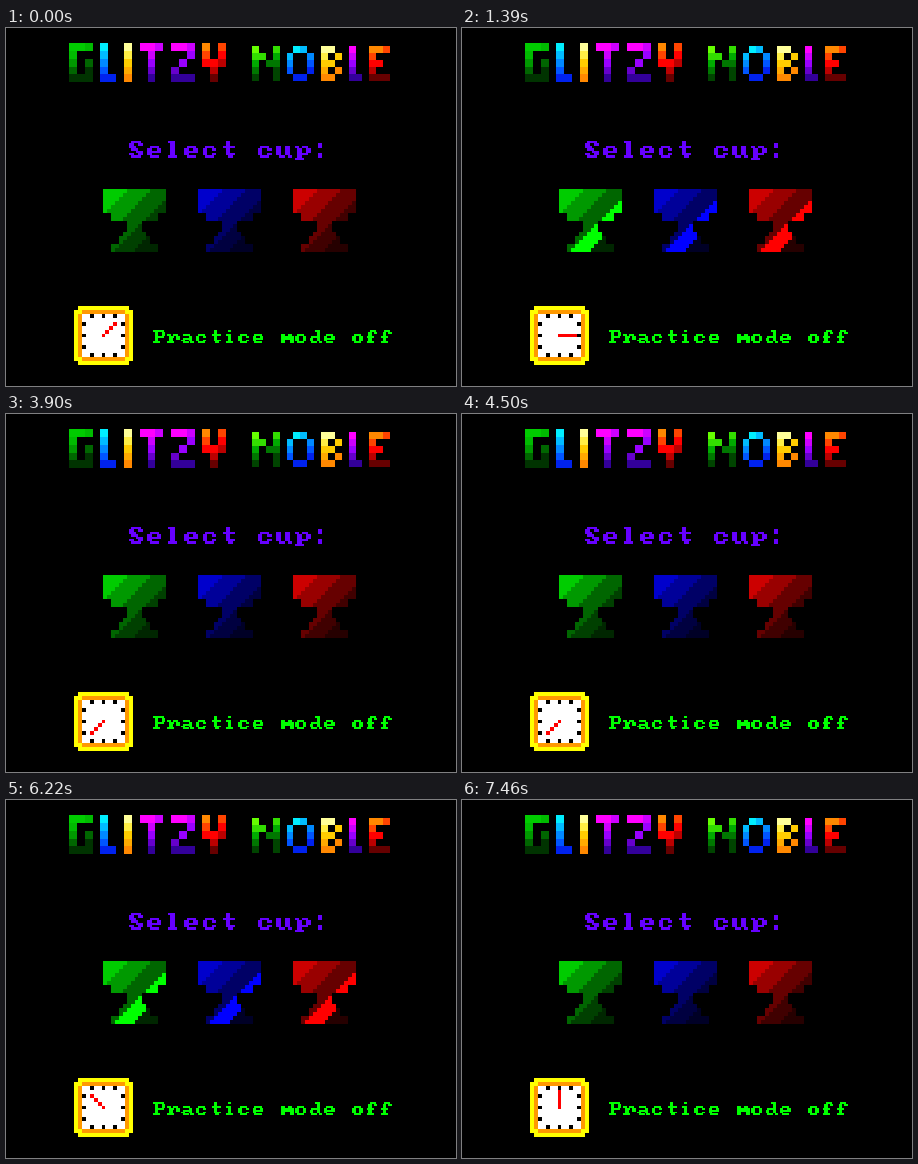
These frames come from a looping animation (450x358 px, 7.74 s). An HTML page with a canvas:

```html
<!DOCTYPE html>
<html lang="en">
<head>
<meta charset="utf-8">
<title>Glitzy Noble</title>
<style>
html, body { margin: 0; width: 100%; height: 100%; overflow: hidden; background: #000; }
canvas { display: block; }
</style>
</head>
<body>
<canvas id="stage" width="450" height="358">GLITZY NOBLE - Select cup: - Practice mode off</canvas>
<script>
const ctx = document.getElementById('stage').getContext('2d');
const LOOP = 7740;

// Glyphs are pen strokes over grid points "xy"; "|" lifts the pen.
const TITLE = {
  G: '20 00 04 24 22', L: '00 04 14', I: '00 04', T: '00 20|10 14',
  Z: '00 20 21 03 04 24', Y: '00 02 22 20|12 14', N: '04 00 33|30 34',
  O: '10 20 31 33 24 14 03 01 10', B: '04 00 10 21 12 23 14 04|02 12',
  E: '20 00 04 24|02 12'
};
const WIDE = { N: 4, O: 4, L: 2, I: 1 };
const TEXT = {
  S: '41 30 10 01 02 12 13 23 34 44 45 36 16 05',
  P: '00 40 51 52 43 13|10 16|06 26',
  a: '12 32 43 45 56|44 14 05 16 26',
  c: '43 32 12 03 05 16 36 45',
  d: '30 40 45 56|43 13 04 05 16 26',
  e: '04 44 43 32 12 03 05 16 36',
  f: '41 30 20 11 16|03 23|06 26',
  i: '20|12 22 26|16 36',
  l: '10 20 26|16 36',
  m: '02 06|42 53 56|03 53|04 54',
  o: '12 32 43 45 36 16 05 03 12',
  p: '02 13 16|07 27|32 42 53 54 45 15',
  r: '02 13 16|06 26|32 42 53 54|23',
  t: '20 25 36 45|12 42',
  u: '02 05 16 26|42 45 56',
  ':': '21 22|25 26'
};

const GREEN = ['#0c0', '#0b0', '#090', '#060', '#030'];
const BLUE = ['#0ef', '#0bf', '#08f', '#05f', '#02e'];
const GOLD = ['#ff9', '#fe4', '#fc0', '#fa0', '#f80'];
const PURPLE = ['#f0f', '#c0f', '#90f', '#60c', '#309'];
const RED = ['#f80', '#f40', '#f00', '#b00', '#600'];
const LIME = ['#6f0', '#3d0', '#0a0', '#070', '#040'];

// Diagonal cup bands: first diagonal and resting brightness.
const BANDS = [[0, 204], [6, 153], [12, 102], [18, 64], [23, 38]];
// Cup outline: [rows, left column], mirrored.
const OUTLINE = [[6, 0], [2, 2], [3, 6], [1, 5], [2, 4], [2, 2]];
// Each shine: start, time per band, end.
const SHINES = [
  [120, 95, 610], [1120, 90, 1600], [2030, 102, 2600], [3020, 93, 3510],
  [3990, 97, 4500], [5000, 87, 5470], [5904, 105, 6440], [6860, 105, 7460]
];
const HAND_TURNS = [970, 1930, 2930, 3900, 4840, 5810, 6770];

function grid(x0, y0, ux, uy = ux) {
  return (x, y, w, h, color) => {
    const l = Math.round(x0 + x * ux), t = Math.round(y0 + y * uy);
    ctx.fillStyle = color;
    ctx.fillRect(l, t, Math.round(x0 + (x + w) * ux) - l, Math.round(y0 + (y + h) * uy) - t);
  };
}

function trace(glyph, dot) {
  for (const stroke of glyph.split('|')) {
    const pts = stroke.split(' ').map(p => [+p[0], +p[1]]);
    let [x, y] = pts[0];
    dot(x, y);
    for (const [tx, ty] of pts) {
      while (x !== tx || y !== ty) {
        x += Math.sign(tx - x);
        y += Math.sign(ty - y);
        dot(x, y);
      }
    }
  }
}

function drawTitle(word, x0, y0, unit, palettes) {
  const cell = grid(x0, y0, unit);
  let left = 0;
  [...word].forEach((ch, i) => {
    trace(TITLE[ch], (x, y) =>
      cell(left + x, y, 1, 1, palettes[i][Math.min(4, Math.floor((x + 2 * y) / 2))]));
    left += (WIDE[ch] || 3) + 1;
  });
}

function drawText(text, x0, y0, ux, uy, color) {
  const cell = grid(x0, y0, ux, uy);
  [...text].forEach((ch, i) => {
    if (ch !== ' ') trace(TEXT[ch], (x, y) => cell(i * 8 + x, y, 2, 1, color));
  });
}

function drawCup(x0, channel, lit) {
  const cell = grid(x0, 161, 63 / 16);
  const shades = BANDS.map(([, v], i) => {
    const rgb = [0, 0, 0];
    rgb[channel] = i === lit ? 255 : v;
    return `rgb(${rgb})`;
  });
  let y = 0;
  for (const [rows, left] of OUTLINE) {
    for (const end = y + rows; y < end; y++) {
      for (let x = left; x < 16 - left; x++) {
        const band = BANDS.filter(([from]) => x + y >= from).length - 1;
        cell(x, y, 1, 1, shades[band]);
      }
    }
  }
}

function drawClock(turn) {
  const cell = grid(68, 278, 59 / 15);
  cell(1, 0, 13, 15, '#ff0');
  cell(0, 1, 15, 13, '#ff0');
  cell(2, 1, 11, 13, '#f90');
  cell(1, 2, 13, 11, '#f90');
  cell(2, 2, 11, 11, '#fff');
  for (const p of [4, 7, 10]) {
    for (const edge of [2, 12]) {
      cell(p, edge, 1, 1, '#000');
      cell(edge, p, 1, 1, '#000');
    }
  }
  const angle = turn * Math.PI / 4;
  const dx = Math.round(Math.sin(angle)), dy = -Math.round(Math.cos(angle));
  const reach = dx && dy ? 3 : 4;
  for (let i = 0; i <= reach; i++) cell(7 + i * dx, 7 + i * dy, 1, 1, '#f00');
}

function litBand(t) {
  const shine = SHINES.find(([start, , end]) => t >= start && t < end);
  return shine ? Math.min(4, Math.floor((t - shine[0]) / shine[1])) : -1;
}

function draw(t) {
  ctx.fillStyle = '#000';
  ctx.fillRect(0, 0, 450, 358);
  drawTitle('GLITZY', 63, 15, 7.85, [GREEN, BLUE, GOLD, PURPLE, PURPLE, RED]);
  drawTitle('NOBLE', 246, 18, 6.9, [LIME, BLUE, GOLD, PURPLE, RED]);
  drawText('Select cup:', 123, 113, 2.3, 2.4, '#60f');
  drawText('Practice mode off', 147, 302, 1.78, 1.9, '#0f0');
  const lit = litBand(t);
  drawCup(97, 1, lit);
  drawCup(192, 2, lit);
  drawCup(287, 0, lit);
  drawClock(1 + HAND_TURNS.filter(at => t >= at).length);
}

const begin = performance.now();
function tick() {
  draw((performance.now() - begin) % LOOP);
  requestAnimationFrame(tick);
}
tick();
</script>
</body>
</html>
```
